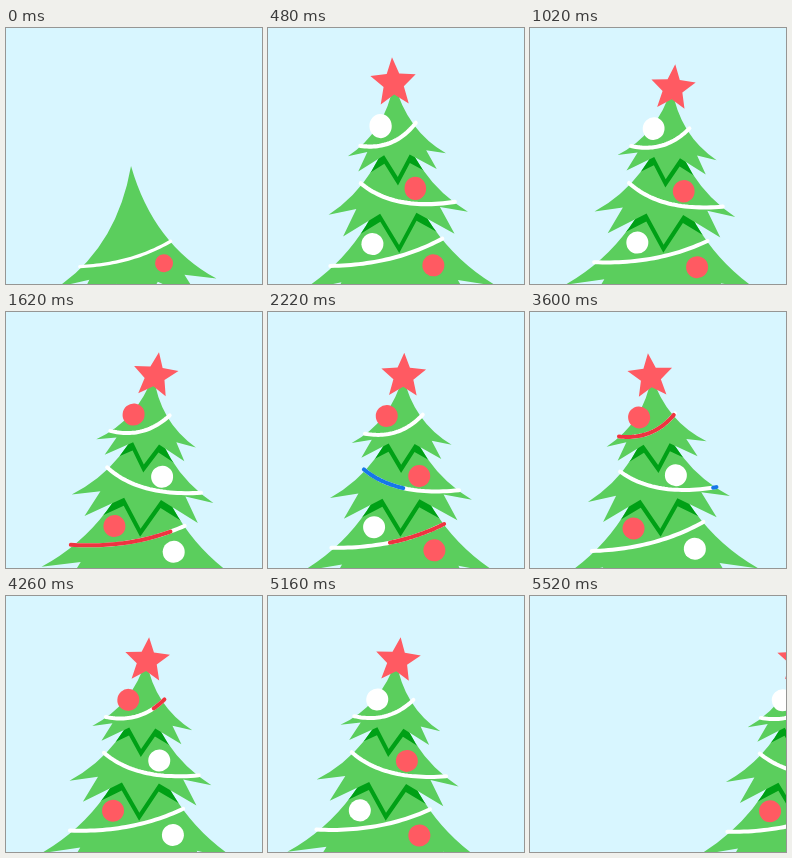
These frames come from a looping animation (256x256 px, 5.55 s). An HTML page with a canvas:

```html
<!DOCTYPE html>
<html lang="en">
<head>
<meta charset="utf-8">
<title>Christmas tree</title>
<style>
html, body { margin: 0; width: 100%; height: 100%; overflow: hidden; background: #d8f6ff; }
canvas { display: block; width: 100vw; height: 100vh; }
</style>
</head>
<body>
<canvas id="stage"></canvas>
<script>
const LOOP = 5550, STEP = 30, SIZE = 256, AXIS = 132;
const SKY = '#d8f6ff', GREEN = '#5bce5d', SHADE = '#00a016';
const RED = '#ff5a62', WHITE = '#ffffff', BLUE = '#1677e8', LAMP = '#ee3440';

const canvas = document.getElementById('stage');
const ctx = canvas.getContext('2d');

const span = (t, from, to) => Math.min(1, Math.max(0, (t - from) / (to - from)));
const smooth = u => u * u * (3 - 2 * u);
const sineOut = u => Math.sin(u * Math.PI / 2);
const backOut = u => u <= 0 ? 0 : 1 + 2.7 * (u - 1) ** 3 + 1.7 * (u - 1) ** 2;
const pop = (t, born) => backOut(span(t, born, born + 360));

// Mirror-symmetric tier: concave sides, then a zigzag hem in units of the half width.
function tierPath(top, base, half) {
  const at = (x, y) => [AXIS + x * half, base + y * half];
  const bendY = top + 0.68 * (base - top);
  const hem = [[1, 0], [0.6, -0.07], [0.8, 0.29], [0.26, 0]];
  const left = hem.map(([x, y]) => at(-x, y));
  const right = hem.map(([x, y]) => at(x, y)).reverse();
  const p = new Path2D();
  p.moveTo(AXIS, top);
  p.quadraticCurveTo(AXIS - 0.23 * half, bendY, ...left[0]);
  [...left, at(0, 0.42), ...right].forEach(q => p.lineTo(...q));
  p.quadraticCurveTo(AXIS + 0.23 * half, bendY, AXIS, top);
  return p;
}

// From bottom to top. A ball is x, y and whether it starts red.
const tiers = [
  { top: 117, base: 260, half: 97, hinge: 270, bend: 0.055, light: LAMP,
    cord: [[63, 236.5], [126, 237], [175.5, 211.5]], balls: [[105.5, 215.5, 0], [166, 238, 1]] },
  { top: 88, base: 187, half: 71, hinge: 195, bend: 0.015, light: BLUE,
    cord: [[94.5, 158], [128, 185], [190, 177.5]], balls: [[150, 164, 1]] },
  { top: 64, base: 132, half: 50, hinge: 125, bend: 0.04, light: LAMP,
    cord: [[95, 122.5], [129.5, 128], [152.5, 102.5]], balls: [[116.5, 104.5, 0]] }
];
tiers.forEach((tier, i) => {
  tier.path = tierPath(tier.top, tier.base, tier.half);
  tier.born = 90 * (i - 1);
});

function around(y, change) {
  ctx.translate(AXIS, y);
  change();
  ctx.translate(-AXIS, -y);
}

// Swings like a rotation, but level lines tilt only by a share of the angle.
function sway(y, angle, share) {
  around(y, () => ctx.transform(1, angle * share, -angle, 1, 0, 0));
}

function drawCord([a, b, c], from, to, color) {
  if (to <= from) return;
  ctx.beginPath();
  for (let i = 0; i <= 30; i++) {
    const u = from + (to - from) * i / 30, v = 1 - u;
    ctx.lineTo(v * v * a[0] + 2 * u * v * b[0] + u * u * c[0],
               v * v * a[1] + 2 * u * v * b[1] + u * u * c[1]);
  }
  ctx.strokeStyle = color;
  ctx.lineWidth = 4;
  ctx.lineCap = 'round';
  ctx.stroke();
}

function drawBall(x, y, radius, red) {
  ctx.beginPath();
  ctx.arc(x, y, radius, 0, Math.PI * 2);
  ctx.fillStyle = red ? RED : WHITE;
  ctx.fill();
}

function drawStar(t, lean) {
  const size = pop(t, 180);
  if (!size) return;
  sway(95, 0.06 * lean, 0.5);
  ctx.translate(AXIS, 64.5);
  ctx.scale(size, size);
  ctx.beginPath();
  for (let i = 0; i < 10; i++) {
    const r = i % 2 ? 10.5 : 23.5, a = i * Math.PI / 5;
    ctx.lineTo(r * Math.sin(a), -r * Math.cos(a));
  }
  ctx.fillStyle = RED;
  ctx.fill();
}

// Springy stretch of everything above the lowest tier.
function stretch(t) {
  const age = Math.max(0, t - 250);
  const s = 0.155 * Math.exp(-age / 460) * Math.sin(2 * Math.PI * age / 600);
  around(215, () => ctx.scale(1 - 0.3 * s, 1 + s));
}

function enterTier(index, t, lean) {
  const { top, base, hinge, bend, born } = tiers[index];
  const size = pop(t, born);
  if (index === 1) stretch(t);
  sway(hinge, bend * lean, index ? 0.5 : 1);
  around(top + 0.8 * (base - top), () => ctx.scale(size, size));
  return size > 0;
}

function drawShadow(index, t, lean) {
  ctx.save();
  ctx.clip(tiers[index - 1].path);
  ctx.translate(0, 8);
  if (enterTier(index, t, lean)) {
    ctx.fillStyle = SHADE;
    ctx.fill(tiers[index].path);
  }
  ctx.restore();
}

function drawTier(index, t, lean) {
  const tier = tiers[index], above = index + 1;
  if (!enterTier(index, t, lean)) return;
  ctx.fillStyle = GREEN;
  ctx.fill(tier.path);
  if (above < tiers.length) drawShadow(above, t, lean);

  // The light fills one cord per beat while it drains from the cord below.
  const beat = (t - 1020) / 905 - index;
  drawCord(tier.cord, 0, 1, WHITE);
  drawCord(tier.cord, sineOut(span(beat, 1, 2)), sineOut(span(beat, 0, 1)), tier.light);

  const swaps = Math.floor(Math.max(0, t - 40 * index) / 1090);
  tier.balls.forEach(([x, y, red]) => {
    const size = red ? 1 : pop(t, tier.born + 90);
    drawBall(x, y, 11 * size, (red + swaps) % 2);
  });

  if (above < tiers.length) drawTier(above, t, lean);
  else drawStar(t, lean);
}

function slide(t) {
  const run = span(t, 5160, 5520);
  return -16 * smooth(span(t, 4600, 5160)) + 150 * run * run;
}

function draw(t) {
  const ratio = window.devicePixelRatio || 1;
  const w = Math.round(innerWidth * ratio), h = Math.round(innerHeight * ratio);
  if (canvas.width !== w || canvas.height !== h) {
    canvas.width = w;
    canvas.height = h;
  }
  ctx.setTransform(w / SIZE, 0, 0, h / SIZE, 0, 0);
  ctx.fillStyle = SKY;
  ctx.fillRect(0, 0, SIZE, SIZE);
  ctx.translate(slide(t), 0);
  drawTier(0, t, -Math.cos(2 * Math.PI * (t - 3150) / 3300));
}

const start = performance.now();
function tick() {
  const t = (performance.now() - start) % LOOP;
  draw(Math.floor(t / STEP) * STEP);
  requestAnimationFrame(tick);
}
tick();
</script>
</body>
</html>
```
